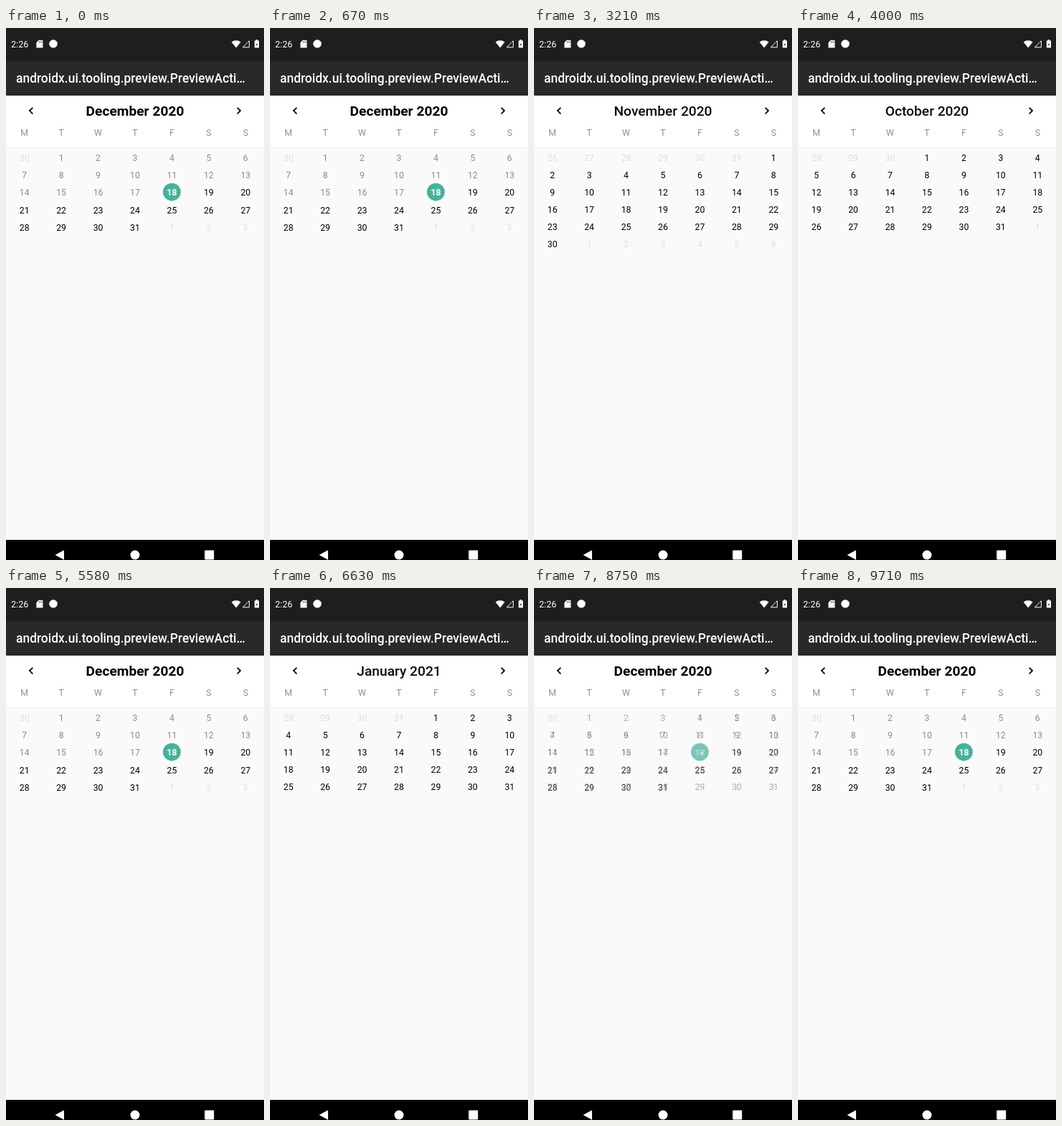
Recreate the animation shown at these times as an HTML page. Size 360 by 740 pixels, loop 9960 ms.

```html
<!DOCTYPE html>
<html lang="en">
<head>
<meta charset="utf-8">
<title>Calendar</title>
<style>
  html, body { margin: 0; width: 100%; height: 100%; overflow: hidden; background: #fafafa; }
  svg { display: block; width: 360px; height: 740px; font-family: Roboto, sans-serif; }
  .bar { fill: #fff; }
  .title { font-size: 17.45px; font-weight: 500; fill: #fff; }
  .month { font-size: 19.2px; font-weight: 500; fill: #0a0a0a; text-anchor: middle; }
  .month.now { font-weight: 700; fill: #000; }
  .cell { font-size: 12.27px; fill: #000; text-anchor: middle; }
  .week { fill: #8f8f8f; }
  .past { fill: #8c8c8c; }
  .out { fill: #dedede; }
  .today { fill: #fff; font-weight: 700; }
  .chevron { fill: none; stroke: #000; stroke-width: 1.8; }
</style>
</head>
<body>
<svg viewBox="0 0 360 740">
  <rect width="360" height="740" fill="#fafafa"/>
  <rect y="94" width="360" height="72" fill="#fff"/>
  <rect y="166" width="360" height="1" fill="#eee"/>
  <rect width="360" height="46" fill="#1e1e1e"/>
  <rect y="46" width="360" height="48" fill="#292929"/>
  <rect y="712" width="360" height="28"/>

  <g class="bar">
    <text x="7" y="26.6" font-size="12.6">2:26</text>
    <path d="M45.4 17h6v10.4h-9V20.2z"/>
    <path d="M46.2 18.4v2.2M48 18.4v2.2M49.8 18.4v2.2" stroke="#1e1e1e" stroke-width=".8"/>
    <circle cx="66" cy="22" r="5.8"/>
    <path d="M314.6 19.6Q321 14.8 327.6 19.6L321.1 27.4z"/>
    <path d="M339.4 17.8v9h-9z" fill="none" stroke="#fff"/>
    <path d="M348.6 16.2h2.6v1.2h1.8v10h-6.2v-10h1.8z"/>
    <circle cx="350" cy="23" r="1" fill="#1e1e1e"/>
    <path d="M81 726.2v13.6L68.6 733z"/>
    <circle cx="180" cy="733" r="6.5"/>
    <rect x="277.2" y="726.6" width="13" height="13" rx="1"/>
  </g>
  <text class="title" x="14" y="76">androidx.ui.tooling.preview.PreviewActi…</text>

  <circle id="ripple" cy="115" r="18" fill="#dedede" opacity="0"/>
  <path class="chevron" d="M37.3 110.8L33 115.1L37.3 119.4M322.7 110.8L327 115.1L322.7 119.4"/>
  <g id="week"></g>
  <g id="grids"></g>
  <g id="titles"></g>
</svg>
<script>
const LOOP = 9960, FADE = 220, FIRST = 2;
const $ = id => document.getElementById(id);

// name, days, weekday of the 1st (Monday = 0), days in the month before
const months = [
  ['October 2020', 31, 3, 30],
  ['November 2020', 30, 6, 31],
  ['December 2020', 31, 1, 30],
  ['January 2021', 31, 4, 31],
  ['February 2021', 28, 0, 31]
];

// start of the cross-fade, direction, time the arrow is held before it
const taps = [
  [2400, -1, 370], [3560, -1, 190], [4700, 1, 75], [5310, 1, 40],
  [6310, 1, 0], [7230, 1, 0], [7920, -1, 0], [8650, -1, 0]
];

function add(parent, tag, attrs, text = '') {
  const el = document.createElementNS('http://www.w3.org/2000/svg', tag);
  for (const key in attrs) el.setAttribute(key, attrs[key]);
  el.textContent = text;
  return parent.appendChild(el);
}

const colX = col => 25.7 + col * 51.43;
const cell = (parent, col, y, text, kind) =>
  add(parent, 'text', { x: colX(col), y: y + 4.4, class: 'cell ' + kind }, text);

[...'MTWTFSS'].forEach((day, i) => cell($('week'), i, 145.6, day, 'week'));

const layers = months.map(([name, days, lead, before], m) => {
  const now = m === FIRST;
  const grid = add($('grids'), 'g', {});
  const title = add($('titles'), 'text', { x: 180, y: 121.8, class: now ? 'month now' : 'month' }, name);
  const cells = Math.ceil((lead + days) / 7) * 7;
  for (let i = 0; i < cells; i++) {
    const n = i - lead + 1, row = Math.floor(i / 7), col = i % 7;
    const y = 180.2 + row * 24 + (now && row > 2 ? 0.9 : 0);
    let label = n, kind = '';
    if (n < 1) { label = before + n; kind = 'out'; }
    else if (n > days) { label = n - days; kind = 'out'; }
    else if (now && n < 18) kind = 'past';
    else if (now && n === 18) {
      kind = 'today';
      add(grid, 'circle', { cx: colX(col), cy: 228.1, r: 12.4, fill: '#45b29d' });
    }
    cell(grid, col, y, label, kind);
  }
  return { grid, title };
});

const clamp = v => Math.max(0, Math.min(1, v));

// cubic-bezier(.4, 0, .2, 1)
function ease(x) {
  if (x <= 0 || x >= 1) return clamp(x);
  let lo = 0, hi = 1, s;
  for (let i = 0; i < 20; i++) {
    s = (lo + hi) / 2;
    const bx = 1.2 * s * (1 - s) ** 2 + 0.6 * s * s * (1 - s) + s ** 3;
    if (bx < x) lo = s; else hi = s;
  }
  return 3 * s * s * (1 - s) + s ** 3;
}

function draw(t) {
  let from = FIRST, to = FIRST, p = 1, glow = 0, grow = 0, dir = -1;
  for (const [start, step, hold] of taps) {
    if (t >= start) {
      from = to;
      to += step;
      p = ease((t - start) / FADE);
    }
    const press = start - hold;
    if (hold && t >= press && t < start + 150) {
      dir = step;
      grow = clamp((t - press) / 100);
      glow = (0.3 + 0.2 * grow) * clamp(1 - (t - start) / 150);
    }
  }
  layers.forEach(({ grid, title }, i) => {
    grid.setAttribute('opacity', i === to ? p : i === from ? 1 - p : 0);
    title.setAttribute('opacity', i === to ? 1 : 0);
  });
  const ripple = $('ripple');
  ripple.setAttribute('cx', dir < 0 ? 35 : 325);
  ripple.setAttribute('r', 12 + 6 * grow);
  ripple.setAttribute('opacity', glow);
}

let begin;
function tick(now) {
  begin ??= now;
  draw((now - begin) % LOOP);
  requestAnimationFrame(tick);
}
draw(0);
requestAnimationFrame(tick);
</script>
</body>
</html>
```
